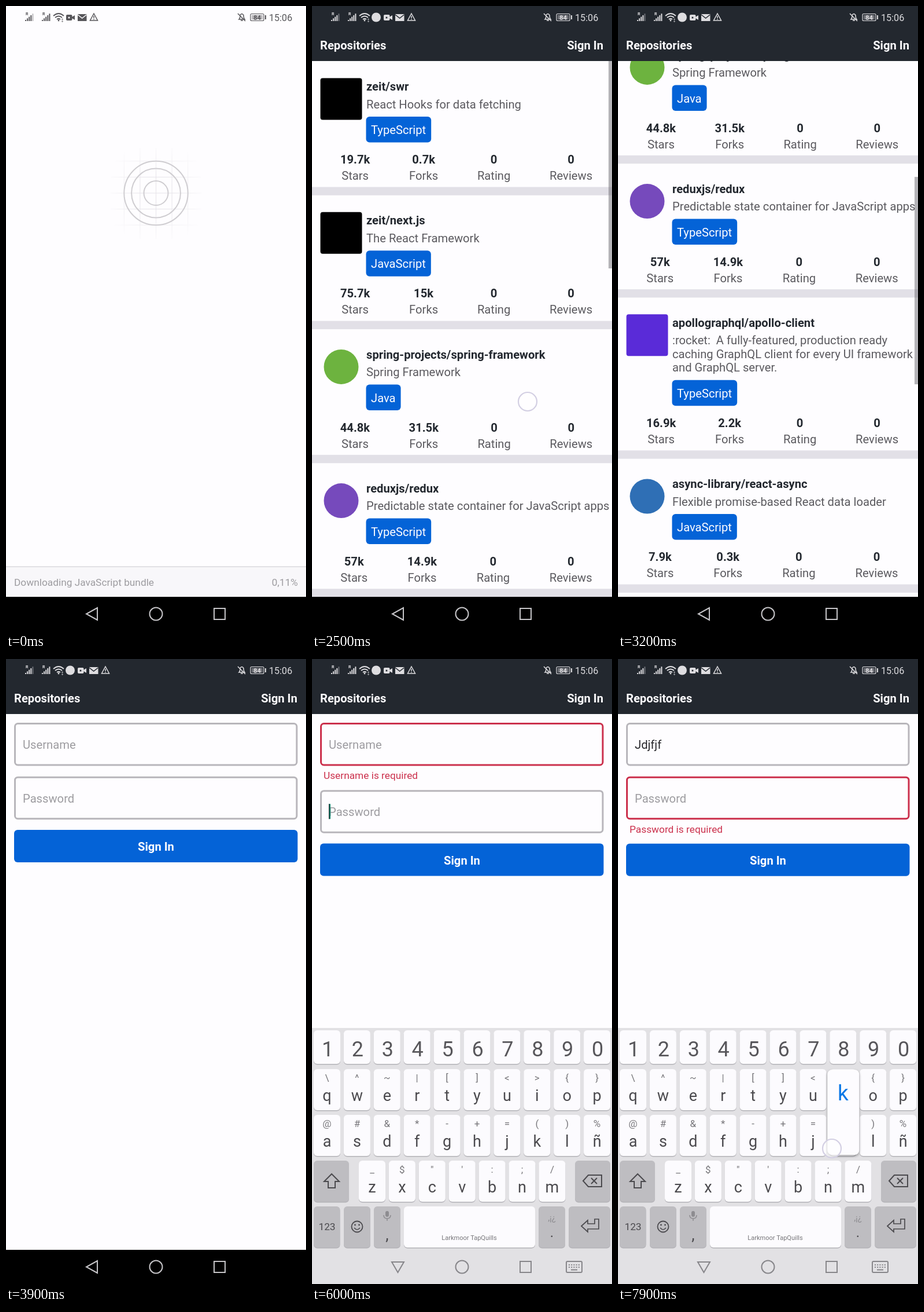
Write an HTML page with a canvas that moves like this. It is 519 px wide and 1079 px high and loops after 8 s.

```html
<!DOCTYPE html>
<html lang="en">
<head>
<meta charset="utf-8">
<title>Repository app demo</title>
<style>
html, body { margin: 0; width: 100%; height: 100%; overflow: hidden; background: #fefdff; }
canvas { display: block; width: 519px; height: 1079px; }
</style>
</head>
<body>
<canvas id="stage"></canvas>
<script>
const W = 519, H = 1079, LOOP = 8000, STEP = 100;
const canvas = document.getElementById('stage');
const c = canvas.getContext('2d');
const dpr = window.devicePixelRatio || 1;
canvas.width = W * dpr;
canvas.height = H * dpr;

const WHITE = '#fefdff', DARK = '#23282f', BLUE = '#0463d7', RED = '#cb304c',
      GREY = '#5b5a5f', PALE = '#e2e0e7', BORDER = '#b8b6bb', HINT = '#9d9ca0';
const BODY = 20.2, SMALL = 17.3;

// y is the middle of the capital letters
function text(s, x, y, size, color, align = 'left', weight = 400) {
  c.font = `${weight} ${size}px Roboto, "Noto Sans CJK JP", sans-serif`;
  c.textAlign = align;
  c.fillStyle = color;
  c.fillText(s, x, y + size * 0.355);
  return c.measureText(s).width;
}
function rect(x, y, w, h, color) {
  c.fillStyle = color;
  c.fillRect(x, y, w, h);
}
function round(x, y, w, h, r, fill, stroke, lw = 2) {
  c.beginPath();
  c.roundRect(x, y, w, h, r);
  if (fill) { c.fillStyle = fill; c.fill(); }
  if (stroke) { c.strokeStyle = stroke; c.lineWidth = lw; c.stroke(); }
}
function circle(x, y, r, fill, stroke, lw = 2) {
  round(x - r, y - r, 2 * r, 2 * r, r, fill, stroke, lw);
}
function line(d, color, lw = 2) {
  c.strokeStyle = color;
  c.lineWidth = lw;
  c.stroke(new Path2D(d));
}
function fade(alpha, draw) {
  c.save();
  c.globalAlpha = alpha;
  draw();
  c.restore();
}
const progress = (t, a, b) => Math.min(1, Math.max(0, (t - a) / (b - a)));

function statusBar(light, appIcon) {
  const fg = light ? '#57565a' : '#dedde0', bg = light ? WHITE : DARK;
  for (const x of [33, 62]) {
    text('R', x + 1, 14, 7, fg, 'left', 700);
    for (let i = 0; i < 5; i++) {
      const h = 2 + i * 2.7;
      fade(x === 33 && i === 4 ? 0.4 : 1, () => rect(x + i * 3.1, 26 - h, 2, h, fg));
    }
  }
  line('M82 17Q91 9 100 17M85 20Q91 15 97 20M88 23Q91 21 94 23', fg, 1.8);
  circle(91, 25, 1.4, fg);
  text('↕', 94, 25, 7, fg);
  if (appIcon) circle(111, 19.5, 8, fg);
  c.save();
  c.translate(appIcon ? 20 : 0, 0);
  round(104, 15, 10.5, 10, 2, fg);
  c.fill(new Path2D('M114 19l5-3v8l-5-3z'));
  circle(109, 20, 1.5, bg);
  rect(124, 14, 15.5, 12, fg);
  line('M124 15l7.7 6 7.7-6', bg, 1.5);
  line('M152 13l6.5 12h-13zM152 17v4M152 22v1.5', fg, 1.5);
  c.restore();
  line('M403 23q2-2 2-7q3-5 6 0q0 5 2 7zM406 25h4M401 13l13 13', fg, 1.5);
  round(423, 13.5, 23, 12, 2, null, fg, 1.2);
  fade(0.4, () => rect(425, 15.5, 19, 8, fg));
  rect(448, 16, 2, 7, fg);
  text('84', 434.5, 19.5, 11.5, fg, 'center', 700);
  text('15:06', 455, 20, 16.2, fg);
}

function navBar(typing) {
  const fg = typing ? '#87868a' : '#c6c5c8';
  rect(0, 1020, W, 59, typing ? '#e2e1e4' : '#000');
  line(typing ? 'M138 1041h21l-10.5 18z' : 'M158 1039v21l-19-10.5z', fg);
  circle(259.5, 1049.5, 11, null, fg);
  line('M360 1040h19v19h-19z', fg);
  if (typing) {
    round(440, 1040, 27, 19, 2, null, fg);
    for (let i = 0; i < 10; i++) rect(444 + i % 5 * 4.2, 1045 + (i > 4) * 4, 2, 2, fg);
    rect(448, 1053.5, 11, 2, fg);
  }
}

function splashRings() {
  const g = c.createRadialGradient(259.5, 323, 30, 259.5, 323, 94);
  g.addColorStop(0, '#e6e4e9');
  g.addColorStop(1, '#fefdff');
  for (let i = -2; i <= 2; i++) {
    const d = i * 27.6;
    line(`M${259.5 + d} 245v157M181 ${323 + d}h157`, g, 1);
  }
  for (const r of [55.2, 42.4, 21]) circle(259.5, 323, r, null, '#cfcdd1');
}

function downloadBar(t) {
  const pct = 0.11 + 99.89 * progress(t, 0, 500);
  rect(0, 968, W, 52, '#f8f7fa');
  rect(0, 967, W, 2, '#e2e1e5');
  text('Downloading JavaScript bundle', 14, 995, SMALL, HINT);
  text(pct.toFixed(2).replace('.', ',') + '%', 505, 995, SMALL, HINT, 'right');
}

const repos = [
  ['zeit/swr', 'React Hooks for data fetching', 'TypeScript', '19.7k', '0.7k', '#000', 4],
  ['zeit/next.js', 'The React Framework', 'JavaScript', '75.7k', '15k', '#000', 4],
  ['spring-projects/spring-framework', 'Spring Framework', 'Java', '44.8k', '31.5k', '#6db33f', 36],
  ['reduxjs/redux', 'Predictable state container for JavaScript apps', 'TypeScript', '57k', '14.9k', '#764abc', 36],
  ['apollographql/apollo-client', ':rocket:  A fully-featured, production ready|caching GraphQL client for every UI framework|and GraphQL server.',
    'TypeScript', '16.9k', '2.2k', '#5a2bd8', 4],
  ['async-library/react-async', 'Flexible promise-based React data loader', 'JavaScript', '7.9k', '0.3k', '#2f6fb5', 36]
];

function stats(values, y) {
  const labels = ['Stars', 'Forks', 'Rating', 'Reviews'];
  const width = (s, weight) => {
    c.font = `${weight} ${BODY}px Roboto, sans-serif`;
    return c.measureText(s).width;
  };
  const widths = labels.map((l, i) => Math.max(width(l, 400), width(values[i], 700)));
  const gap = (504 - widths.reduce((a, b) => a + b)) / 4;
  let x = 15 + gap / 2;
  labels.forEach((label, i) => {
    const mid = x + widths[i] / 2;
    text(values[i], mid, y, BODY, DARK, 'center', 700);
    text(label, mid, y + 28, BODY, GREY, 'center');
    x += widths[i] + gap;
  });
}

function list(t, scroll) {
  let y = 139 - scroll;
  repos.forEach(([name, about, language, stars, forks, color, radius], i) => {
    const lines = about.split('|'), extra = (lines.length - 1) * 23.5;
    const size = radius > 4 ? 60 : 72, inset = (72 - size) / 2, start = 1800 + i * 80;
    fade(progress(t, start - STEP, start + 200), () =>
      round(14.5 + inset, y - 14.5 + inset, size, size, Math.min(radius, size / 2), color));
    text(name, 94, y, BODY, DARK, 'left', 700);
    lines.forEach((s, n) => text(s, 94, y + 30.5 + n * 23.5, BODY, GREY));
    c.font = `${BODY}px Roboto, sans-serif`;
    round(93.5, y + 52 + extra, c.measureText(language).width + 17.5, 44.5, 6, BLUE);
    text(language, 102, y + 75 + extra, BODY, WHITE);
    stats([stars, forks, '0', '0'], y + 126 + extra);
    rect(0, y + 173.5 + extra, W, 14.3, PALE);
    y += 231.2 + extra;
  });
  rect(513, 95 + scroll * 0.387, 6, 358, 'rgba(110,109,115,.5)');
}

// a finger drag followed by a decelerating fling
function scrollAt(t) {
  const drag = 339 * progress(t, 2500, 2900) ** 1.5;
  const fling = 190 * (1 - (1 - progress(t, 2900, 3500)) ** 4);
  return Math.round(drag + fling);
}

function header() {
  rect(0, 0, W, 95, DARK);
  text('Repositories', 14, 68, BODY, WHITE, 'left', 700);
  text('Sign In', 504, 68, BODY, WHITE, 'right', 700);
}

function field(y, placeholder, value, error, caret, composing) {
  round(15.5, y + 1.5, 487.5, 71.5, 5, WHITE, error ? RED : BORDER, 3);
  const w = text(value || placeholder, 29, y + 38, BODY, value ? '#252529' : HINT);
  if (value && composing) rect(29, y + 46, w, 1.5, '#252529');
  if (caret) {
    const x = value ? 29 + w : 29;
    rect(x, y + 24, 3, 26, '#16806c');
    rect(x, y + 24, 1, 26, '#1d2428');
  }
  if (error) text(placeholder + ' is required', 20, y + 91, SMALL, RED);
}

const presses = [[6500, 'j'], [6700, 'd'], [6900, 'j'], [7100, 'f'], [7200, 'j'], [7300, 'f'], [7900, 'k']];
const focusChanges = [[4600, 'user'], [5600, 'pass'], [6300, 'user'], [7400, 'pass']];

function formState(t) {
  const [since, focus] = focusChanges.filter(([at]) => t >= at).pop() || [0, ''];
  const typed = presses.slice(0, 6).filter(([at]) => t >= at).map(p => p[1]).join('');
  return {
    focus,
    value: typed && typed[0].toUpperCase() + typed.slice(1),
    blink: (t - since) % 1000 < 500,
    userError: t >= 5600 && !typed,
    passError: t >= 6300
  };
}

function form(s) {
  const user = s.focus === 'user';
  let y = 110;
  field(y, 'Username', s.value, s.userError, user && (s.value || s.blink), user);
  y += 92.7 + (s.userError ? 23.5 : 0);
  field(y, 'Password', '', s.passError, s.focus === 'pass' && s.blink);
  y += 92.3 + (s.passError ? 23.7 : 0);
  round(14, y, 490.5, 56, 6, BLUE);
  text('Sign In', 259.5, y + 29, BODY, WHITE, 'center', 700);
}

function key(x, y, w, h, dark) {
  round(x, y + 1.5, w, h, 6, '#b4b3b8');
  round(x, y, w, h, 6, dark ? '#bebdc1' : '#fcfbfe');
}

function toolbar(s) {
  const fg = '#58575b';
  rect(0, 511, W, 63, '#dfdee2');
  rect(0, 574, W, 63, '#efeef2');
  round(24, 521, 44, 44, 5, '#fff');
  circle(44.5, 541, 6, null, fg, 1.6);
  line('M49 546l6 6', fg, 1.6);
  round(103, 532, 28, 23, 4, null, fg, 1.6);
  text('GIF', 117, 543.5, 11, fg, 'center', 700);
  line('M179 530h18q4 0 4 4v13l-8 8h-14q-3 0-3-4v-17q0-4 3-4M201 547h-5q-3 0-3 3v5M183 538v2M193 538v2M181 545q6 6 12 0', fg, 1.6);
  line('M254 532h-6v24h23v-24h-6M254 529h11v6h-11zM253 541h13M253 546h13M253 551h8', fg, 1.6);
  text('a', 317, 547, 22, fg);
  text('あ', 329, 537, 16, fg);
  line('M321 539q0-7 7-7m-3-3l3 3-3 3M341 547q0 7-8 7m3-3l-3 3 3 3', fg, 1.5);
  circle(401.5, 543, 13.5, null, fg, 1.6);
  line('M401.5 541v9M401.5 536v2', fg, 2);
  for (const x of [465, 473, 481]) circle(x, 543, 1.6, fg);
  line('M18 597l7 7 7-7M18 616l7-7 7 7', fg, 1.6);
  if (s.value.length > 1) {
    text('Hd', 109.5, 607, 27, fg, 'center');
    text('Jd', 259.5, 607, 27, '#0a78e6', 'center', 500);
    text('Ud', 404, 607, 27, fg, 'center');
  }
}

const keyRows = [
  ['qwertyuiop', '\\^~|[]<>{}', 26, 708],
  ['asdfghjklñ', '@#&*-+=()%', 26, 787],
  ['zxcvbnm', '_$"\':;/', 104, 866]
];

function keyboard(s) {
  const fg = '#4b4a4e', soft = '#77767a', user = s.focus === 'user';
  rect(0, 637, W, 383, '#e2e1e4');
  if (user) toolbar(s);
  [...'1234567890'].forEach((ch, i) => {
    const x = 26 + i * 51.9;
    key(x - 23, 641, 46, 58);
    text(ch, x + 1, 673, 36, '#58575b', 'center');
  });
  const caps = user && !s.value;
  for (const [letters, hints, left, y] of keyRows) {
    [...letters].forEach((ch, i) => {
      const x = left + i * 51.9;
      key(x - 23, y, 46, 71);
      text(hints[i], x, y + 15, 17, soft, 'center');
      text(caps ? ch.toUpperCase() : ch, x, y + 45.5, 27, fg, 'center');
    });
  }
  for (const [x, y, w, plain] of [[3, 866, 61], [455, 866, 61], [3, 945, 45.5], [55, 945, 46],
    [107, 945, 46], [159, 945, 227, 1], [392, 945, 46], [444, 945, 72]]) key(x, y, w, 71, !plain);
  line('M34 889l13 13h-7v11h-12v-11h-7z', fg);
  line('M469 901l9-10h23v20h-23zM483 896l10 10M493 896l-10 10', fg);
  text('123', 26, 980, SMALL, fg, 'center');
  circle(78, 980, 9.5, null, fg, 1.8);
  circle(74.5, 977, 1.4, fg);
  circle(81.5, 977, 1.4, fg);
  line('M73 982q5 6 10 0', fg, 1.6);
  round(127, 953, 6, 10, 3, '#8d8c90');
  line('M124 960q0 6 6 6t6-6M130 966v4', '#8d8c90', 1.5);
  text(',', 130, 993, 27, fg, 'center');
  text('Larkmoor TapQuills', 272, 999, 11, soft, 'center');
  text(',¡¿', 415, 965, 15, '#8d8c90', 'center');
  text('.', 415, 989, 24, fg, 'center');
  line('M466 979l11-10v6h12v-8h7v17h-19v5z', fg, 1.7);
}

function touch(x, y, alpha = 1) {
  fade(alpha, () => circle(x, y, 16, 'rgba(255,255,255,.6)', '#d3cfe3', 2.2));
}

function popup(letter) {
  const x = 26 + 'asdfghjklñ'.indexOf(letter) * 51.9;
  c.save();
  c.shadowColor = 'rgba(0,0,0,.35)';
  c.shadowBlur = 4;
  c.shadowOffsetY = 2;
  round(x - 27, 709, 55, 147, 8, '#fdfcff');
  c.restore();
  text(letter, x, 749, 37, '#0a78e6', 'center');
}

const taps = [[3700, 3800, 473, 57], [4400, 4600, 215, 150], [5400, 5600, 230, 243],
  [6100, 6300, 215, 150], [7300, 7500, 230, 243]];

function touches(t, scroll) {
  if (t >= 2500 && t < 2900) touch(373, 683 - scroll);
  for (const [from, to, x, y] of taps) if (t >= from && t < to) touch(x, y);
  for (const [at, letter] of presses) {
    const age = t - at;
    if (age < 0 || age > 300) continue;
    if (age < 100) popup(letter);
    const right = 'jk'.includes(letter);
    touch(right ? (letter === 'k' ? 370 : 366) : 166, letter === 'k' ? 845 : right ? 835 : 819, 1 - age / 500);
  }
}

function draw(t) {
  const scroll = scrollAt(t);
  const s = formState(t);
  const app = t >= 1300;
  rect(0, 0, W, H, WHITE);
  if (t < 1400) fade(app ? 0.4 : 1, splashRings);
  if (t < 600) downloadBar(t);
  if (t >= 1700 && t < 3800) list(t, scroll);
  if (t >= 3800) form(s);
  if (app) header();
  statusBar(!app, t >= 700);
  if (s.focus) {
    c.save();
    c.translate(0, 510 * (1 - progress(t, 4600, 5000)) ** 2);
    keyboard(s);
    c.restore();
  }
  navBar(t >= 4600);
  touches(t, scroll);
}

function tick(now) {
  c.setTransform(dpr, 0, 0, dpr, 0, 0);
  draw(Math.floor(now % LOOP / STEP) * STEP);
  requestAnimationFrame(tick);
}
requestAnimationFrame(tick);
</script>
</body>
</html>
```
